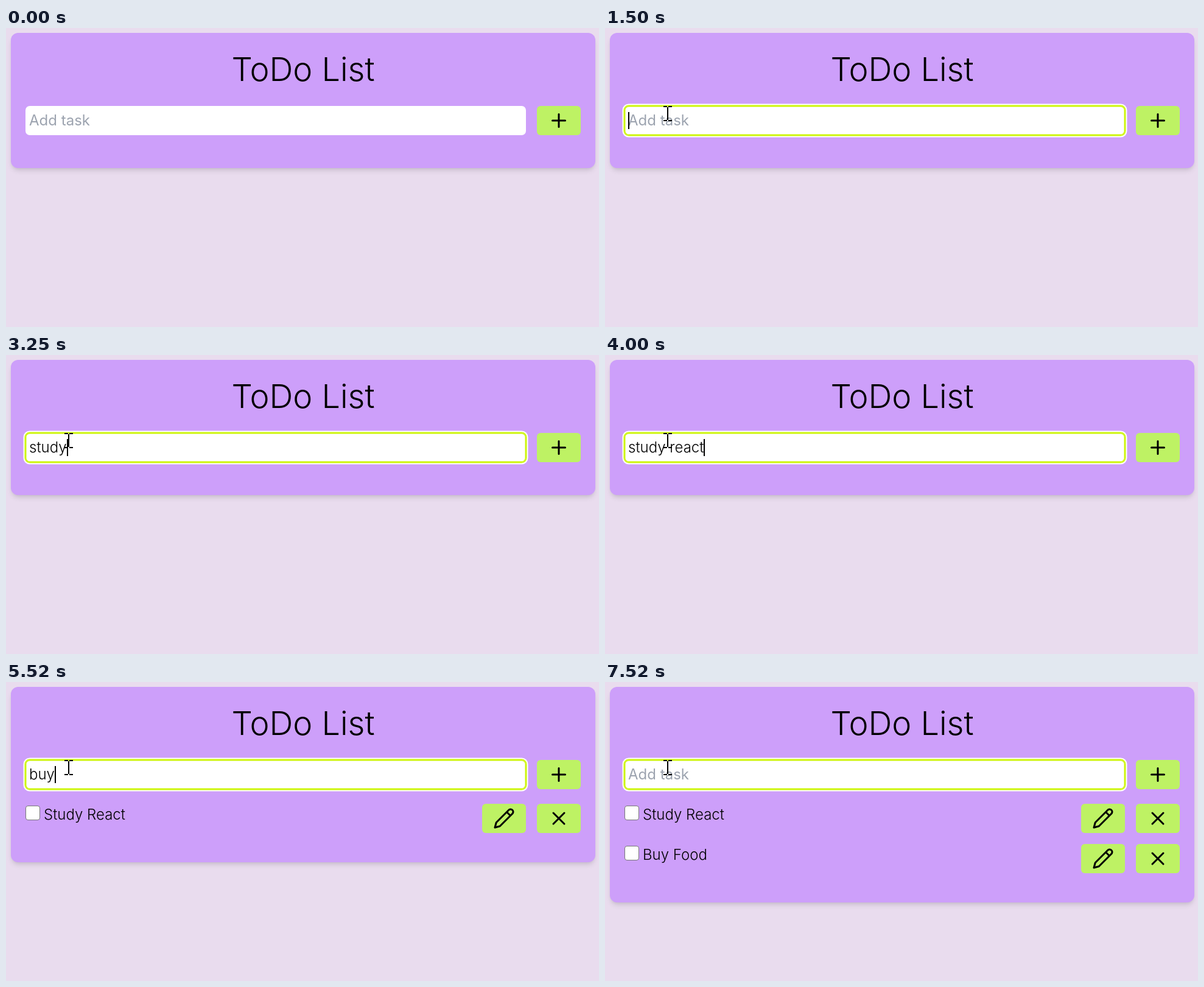
Recreate the animation shown at these times as an HTML page. Size 974 by 491 pixels, loop 8 s.

```html
<!DOCTYPE html>
<html lang="en">
<head>
<meta charset="utf-8">
<title>ToDo List</title>
<style>
  html, body { margin: 0; width: 100%; height: 100%; overflow: hidden; background: #e9dcee; }
  body { position: relative; color: #000; font: 300 24px/36px Inter, sans-serif; }
  div, svg { position: absolute; box-sizing: border-box; }
  svg { overflow: visible; fill: none; }
  .card {
    left: 8px; top: 8px; width: 960px; height: 222px; border-radius: 12px; background: #cd9ffa;
    box-shadow: 0 6px 9px -1.5px rgba(0, 0, 0, .1), 0 3px 6px -3px rgba(0, 0, 0, .1);
  }
  .title { left: 0; top: 30px; width: 960px; font-size: 54px; line-height: 60px; text-align: center; }
  .field {
    left: 24px; top: 120px; width: 822px; height: 48px; padding-left: 6px;
    border-radius: 7px; background: #fff; line-height: 48px; white-space: pre;
  }
  .field.focus { box-shadow: inset 0 0 0 1.5px #cdf50c, 0 0 0 1.5px #cdf50c, 0 0 0 3.5px #fff; }
  .field.empty .text { color: #9ca3af; font-weight: 400; }
  .caret { top: 10px; width: 2px; height: 28px; background: #000; }
  .button { width: 72px; height: 48px; border-radius: 6px; background: #bef264; }
  .button svg {
    left: 18px; top: 6px; width: 36px; height: 36px;
    stroke: #000; stroke-width: 2; stroke-linecap: round; stroke-linejoin: round;
  }
  .row { left: 24px; width: 912px; height: 48px; }
  .box { left: 0; top: 3px; width: 24px; height: 24px; border: 1.5px solid #767676; border-radius: 4px; background: #fff; }
  .label { left: 30px; top: 0; white-space: pre; }
  .pointer { left: 0; top: 0; width: 18px; height: 27px; }
  .halo { left: 74px; top: 111px; width: 36px; height: 36px; border-radius: 50%; background: rgba(255, 255, 0, .5); }
</style>
</head>
<body>
<div class="card">
  <div class="title">ToDo List</div>
  <div class="field"><span class="text"></span><div class="caret"></div></div>
</div>
<svg class="pointer" id="arrow"><path d="M.8 1.5V23.4L6.2 18.3 9.6 26.2 13 24.8 9.6 17.1H16.7Z" fill="#fff" stroke="#000" stroke-width="1.3"/></svg>
<svg class="pointer" id="beam"><path d="M0 1H6M8 1H14M7 2V23M0 24H6M8 24H14" stroke="#000" stroke-width="2"/></svg>
<div class="halo"></div>
<script>
  const LOOP = 8000;
  const find = selector => document.querySelector(selector);
  const card = find('.card'), field = find('.field'), text = find('.text');
  const caret = find('.caret'), halo = find('.halo');
  const pointers = { arrow: find('#arrow'), beam: find('#beam') };

  const icons = {
    plus: 'M5 12H19M12 5V19',
    cross: 'M18 6L6 18M6 6L18 18',
    pencil: 'M17 3a2.85 2.83 0 1 1 4 4L7.5 20.5 2 22l1.5-5.5ZM15 5l4 4'
  };
  const button = (icon, x, y) =>
    `<div class="button" style="left:${x}px;top:${y}px"><svg viewBox="0 0 24 24"><path d="${icons[icon]}"/></svg></div>`;

  card.insertAdjacentHTML('beforeend', button('plus', 864, 120));

  const tasks = [[4520, 'Study React'], [7520, 'Buy Food']].map(([time, name], i) => {
    const row = document.createElement('div');
    row.className = 'row';
    row.style.top = 192 + 66 * i + 'px';
    row.innerHTML = `<div class="box"></div><div class="label">${name}</div>`
      + button('pencil', 750, 0) + button('cross', 840, 0);
    card.append(row);
    return { time, row };
  });

  // time, pointer shape, x, y
  const moves = [
    [0, null, 0, 0],
    [250, 'arrow', 279, 228],
    [490, 'arrow', 251, 221],
    [750, 'beam', 36, 122],
    [1000, 'beam', 40, 118],
    [1250, 'beam', 88, 118],
    [1500, 'beam', 96, 128]
  ];

  // time, typed text, caret visible
  const typing = [
    [0, '', false], [1500, '', true], [2000, '', false],
    [2250, 'st', true], [2750, 'stu', true], [3000, 'stud', true], [3250, 'study', true],
    [3500, 'study re', true], [3750, 'study rea', true], [4000, 'study react', true],
    [4520, '', false],
    [5020, 'b', true], [5270, 'bu', true], [5520, 'buy', true], [6020, 'buy ', true],
    [6270, 'buy f', true], [6520, 'buy fo', true], [6770, 'buy foo', true], [7020, 'buy food', true],
    [7520, '', false]
  ];

  const stepAt = (steps, t) => steps.findLast(step => step[0] <= t);
  const show = (element, visible) => { element.style.visibility = visible ? 'visible' : 'hidden'; };

  function draw(t) {
    const [, shape, x, y] = stepAt(moves, t);
    for (const name in pointers) {
      show(pointers[name], name === shape);
      pointers[name].style.transform = `translate(${x}px, ${y}px)`;
    }
    show(halo, t >= 1250 && t < 1500);

    const [, typed, caretOn] = stepAt(typing, t);
    const content = typed || 'Add task';
    if (text.textContent !== content) text.textContent = content;
    field.classList.toggle('empty', !typed);
    field.classList.toggle('focus', t >= 1500);
    show(caret, caretOn);
    caret.style.left = 6 + (typed ? text.getBoundingClientRect().width : 0) + 'px';

    const done = tasks.filter(task => t >= task.time).length;
    tasks.forEach((task, i) => show(task.row, i < done));
    card.style.height = 222 + 66 * done + 'px';
  }

  const start = performance.now();
  function tick() {
    draw((performance.now() - start) % LOOP);
    requestAnimationFrame(tick);
  }
  tick();
</script>
</body>
</html>
```
